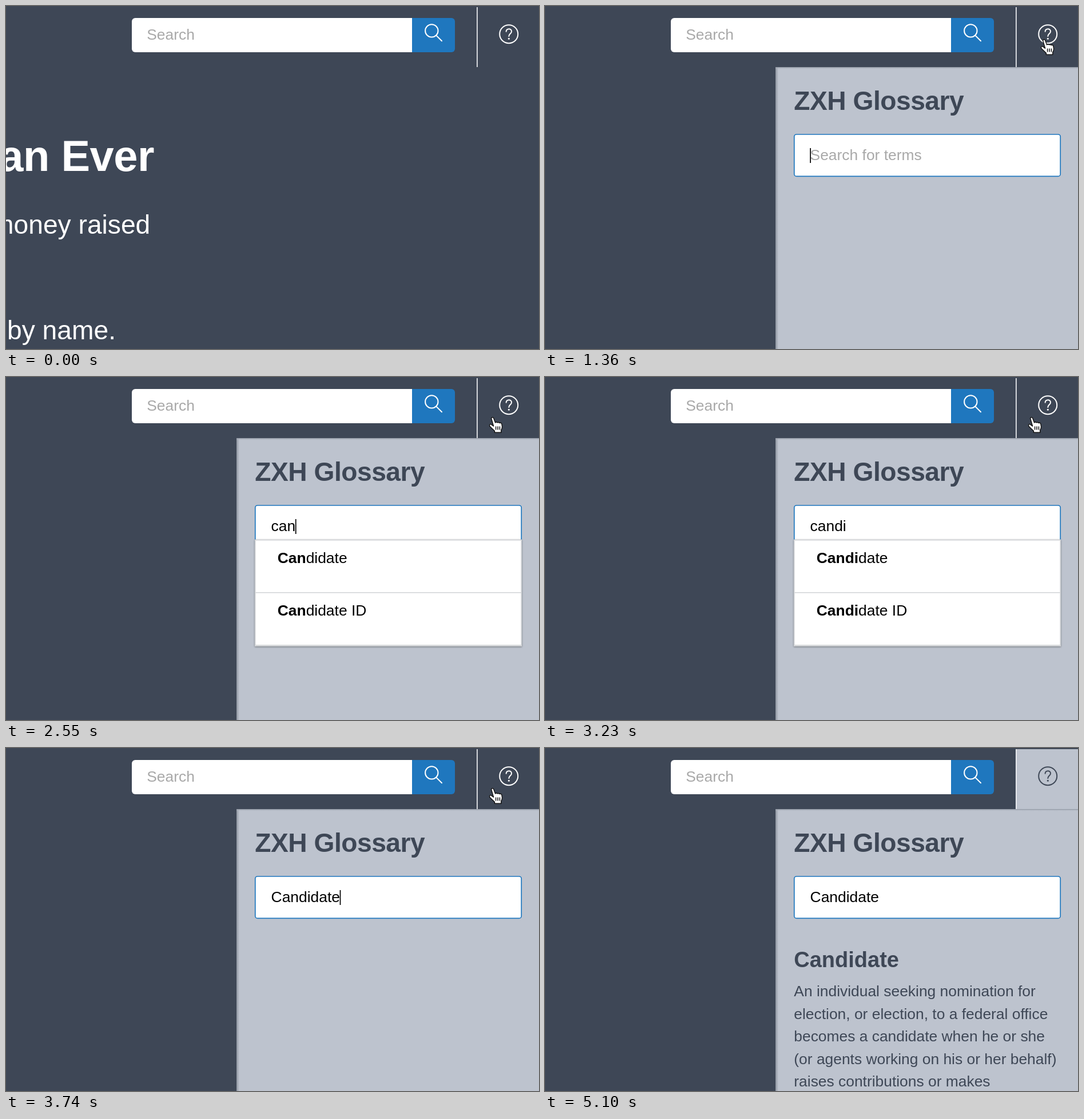
These frames come from a looping animation (932 by 601 pixels, 5.27 s). An HTML page:

```html
<!DOCTYPE html>
<html lang="en">
<head>
<meta charset="utf-8">
<title>Glossary search</title>
<style>
  html, body { margin: 0; width: 100%; height: 100%; overflow: hidden; background: #3e4756; }
  svg { display: block; font: 26.4px "Liberation Sans", Arial, sans-serif; }
  .bold { font-weight: bold; }
  .hero { fill: #fff; font-size: 46.2px; }
  .slate { fill: #3e4756; }
  .hint { fill: #a9a9a9; }
  .line { fill: none; stroke-width: 2; stroke-linecap: round; }
  #menu { filter: drop-shadow(0 1px 1.5px rgba(0, 0, 0, .4)); }
</style>
</head>
<body>
<svg width="932" height="601" viewBox="0 0 932 601">
  <defs>
    <linearGradient id="edgeX">
      <stop stop-color="#8d949f"/><stop offset="1" stop-color="#bdc3ce"/>
    </linearGradient>
    <linearGradient id="edgeY" x2="0" y2="1">
      <stop stop-color="#8d949f"/><stop offset="1" stop-color="#bdc3ce" stop-opacity="0"/>
    </linearGradient>
  </defs>
  <rect width="932" height="601" fill="#3e4756"/>

  <!-- top bar -->
  <rect x="220" y="21" width="510" height="60" rx="6" fill="#fff"/>
  <path d="M710 21h69a6 6 0 0 1 6 6v48a6 6 0 0 1-6 6h-69z" fill="#1f77be"/>
  <text class="hint" x="246.2" y="58.5">Search</text>
  <g class="line" stroke="#fff"><circle cx="744.3" cy="43.4" r="11.2"/><path d="M752.3 51.6 762 61.3"/></g>
  <rect id="tab" x="823" y="2" width="109" height="106" fill="#bdc3ce"/>
  <rect x="823" y="2" width="1.7" height="105" fill="#eef0f3"/>
  <g id="help" class="line">
    <circle cx="879.2" cy="49.2" r="16"/>
    <path d="M874.6 44.8c.2-6 9.4-6 9.4-.3 0 4.2-4.7 4-4.7 8.6"/>
    <path d="M879.3 57.2v.1" stroke-width="3"/>
  </g>

  <g id="hero">
    <text class="hero bold" x="259" y="289" text-anchor="end" letter-spacing="-.5" style="font-size:75.9px">an Ever</text>
    <text class="hero" x="252.3" y="399" text-anchor="end">money raised</text>
    <text class="hero" x="2" y="584">by name.</text>
  </g>

  <g id="panel">
    <rect x="403" y="107" width="529" height="494" fill="#bdc3ce"/>
    <rect x="403" y="107" width="5" height="494" fill="url(#edgeX)"/>
    <rect x="403" y="107" width="529" height="4" fill="url(#edgeY)"/>
    <text class="slate bold" x="435.3" y="182" font-size="46.2" letter-spacing="-.5">ZXH Glossary</text>
    <rect x="435.8" y="225" width="465.4" height="73.4" rx="4" fill="#fff" stroke="#1f77be" stroke-width="1.7"/>
    <text id="hint" class="hint" x="463.6" y="269.5">Search for terms</text>
    <text id="typed" x="463.6" y="269.5"></text>
    <rect id="caret" y="249" width="1.7" height="26"/>

    <g id="menu">
      <rect x="435" y="284.6" width="467" height="187.4" fill="#d3d5d8"/>
      <rect id="first" x="436.7" y="286.5" width="463.6" height="90.5"/>
      <rect x="436.7" y="378.6" width="463.6" height="90.6" fill="#fff"/>
      <text id="pick" x="474.8" y="326"><tspan class="bold"></tspan><tspan></tspan></text>
      <text id="other" x="474.8" y="418"><tspan class="bold"></tspan><tspan></tspan></text>
    </g>

    <g id="entry" class="slate">
      <text class="bold" x="435.3" y="384" font-size="38">Candidate</text>
    </g>
  </g>

  <g id="hand" stroke="#111" stroke-linejoin="round">
    <path fill="#fff" stroke-width="1.4" d="M4.6 3.4Q6 .4 8.4 2.6L11.6 11Q13.6 9 15.4 11Q17.4 9.6 19 11.6Q21.8 10.6 22.8 13.2L23.6 18Q23.6 21.4 21.8 24V28.2H10.4V25.6L2 17.4Q.6 13.6 3.8 13.6L8.6 17.2Z"/>
    <path fill="none" stroke-width="1.5" d="M12.6 17.5v6M16 17.5v6M19.4 17.5v6"/>
  </g>
  <path id="arrow" d="M1 1V23.4L6 18.8 9.4 26.8 13 25.2 9.7 17.5H16.4Z" fill="#000" stroke="#fff" stroke-width="1.6"/>
</svg>
<script>
const LOOP = 5270, START = 463.6;
const $ = id => document.getElementById(id);

// Each entry: [start time, value]
const typing = [[0, ""], [2210, "c"], [2380, "ca"], [2550, "can"], [2720, "cand"], [2890, "candi"], [3400, "Candidate"]];
const caretOn = [[0, true], [1700, false], [2210, true], [3230, false], [3400, true], [4250, false], [4760, true], [5100, false]];
const pointer = [
  [0, null], [340, ["hand", 871.5, 41]], [680, ["hand", 865, 54]], [850, ["hand", 866, 55]],
  [1360, ["hand", 866, 57]], [1530, ["hand", 859, 56]], [1700, ["hand", 844, 64]],
  [1870, ["hand", 844, 69]], [4590, ["arrow", 694, 302]], [4760, ["arrow", 499, 560]], [4930, null]
];
const definition = [
  "An individual seeking nomination for",
  "election, or election, to a federal office",
  "becomes a candidate when he or she",
  "(or agents working on his or her behalf)",
  "raises contributions or makes"
];

definition.forEach((line, i) => {
  const text = document.createElementNS("http://www.w3.org/2000/svg", "text");
  text.setAttribute("x", 435.3);
  text.setAttribute("y", 435 + i * 39.6);
  text.textContent = line;
  $("entry").append(text);
});

const valueAt = (steps, t) => steps.findLast(([from]) => from <= t)[1];
const show = (id, on) => $(id).style.display = on ? "" : "none";

function split(id, term, count) {
  const [match, rest] = $(id).children;
  match.textContent = term.slice(0, count);
  rest.textContent = term.slice(count);
}

function draw() {
  const t = performance.now() % LOOP;
  const open = t >= 1360, lit = t >= 4590, chosen = t >= 3400;
  show("hero", !open);
  show("panel", open);
  show("tab", lit);
  $("help").setAttribute("stroke", lit ? "#3e4756" : "#fff");

  const word = valueAt(typing, t);
  $("typed").textContent = word;
  show("hint", !word);
  show("caret", valueAt(caretOn, t));
  $("caret").setAttribute("x", START - .3 + (word && open ? $("typed").getComputedTextLength() : 0));

  show("menu", t >= 2550 && t < 3740);
  $("first").setAttribute("fill", chosen ? "#1f77be" : "#fff");
  $("pick").setAttribute("fill", chosen ? "#fff" : "#000");
  const count = Math.min(word.length, 5);
  split("pick", "Candidate", count);
  split("other", "Candidate ID", count);
  show("entry", t >= 3910);

  const [shape, x, y] = valueAt(pointer, t) || [];
  for (const id of ["hand", "arrow"]) show(id, id === shape);
  if (shape) $(shape).setAttribute("transform", `translate(${x} ${y})`);
  requestAnimationFrame(draw);
}
draw();
</script>
</body>
</html>
```
